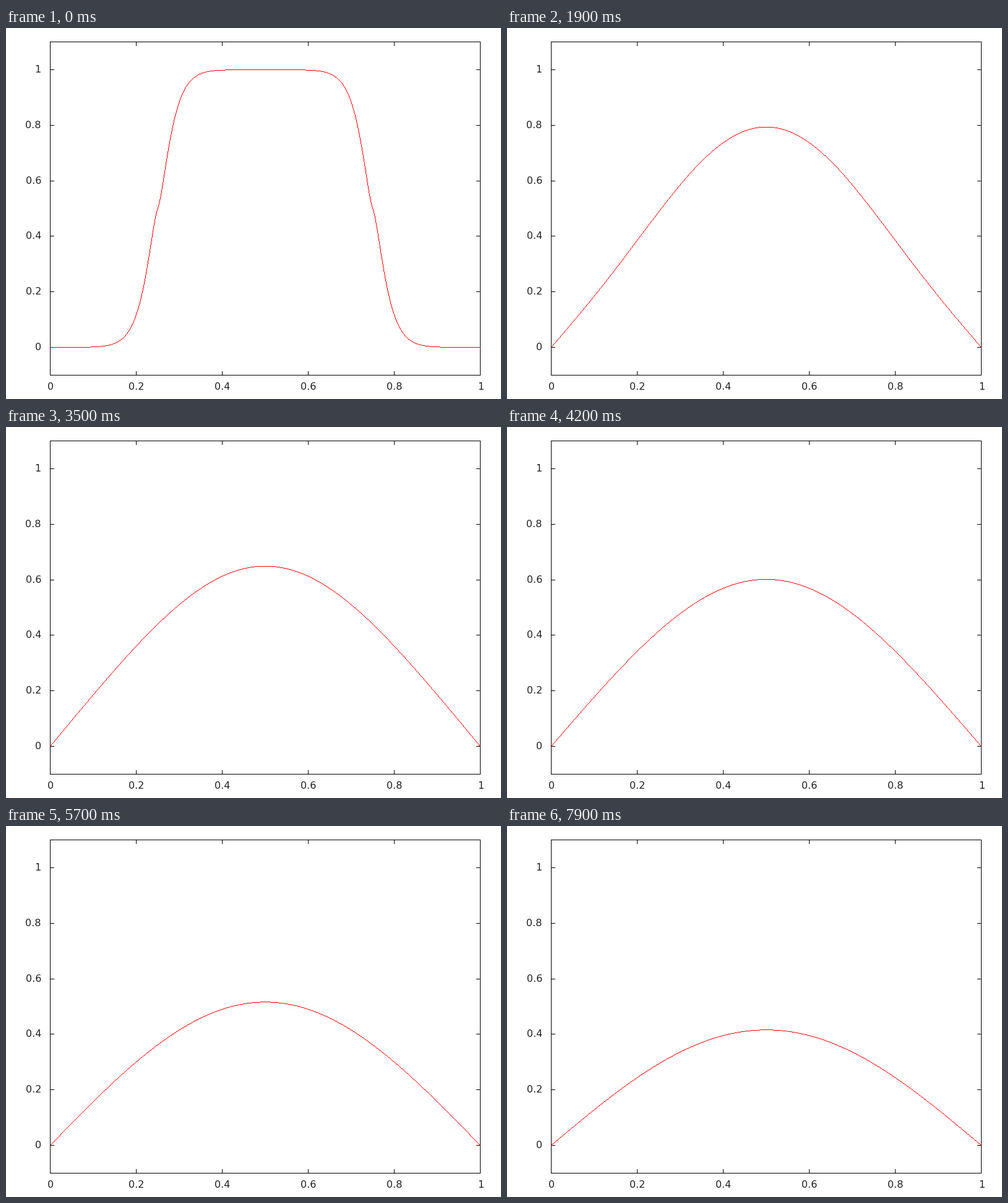
These frames come from a looping animation (800 px wide and 600 px high, 8 s). A matplotlib script:

```python
import numpy as np
import matplotlib.pyplot as plt
from matplotlib.animation import FuncAnimation
from matplotlib.collections import LineCollection

W, H, DPI = 800, 600, 100
FRAMES, INTERVAL = 80, 100
HAIR = 0.4 * 72 / DPI  # stays inside one pixel, which is then filled whole

# Pixel columns and rows of the plot box and its scale
LEFT, RIGHT, TOP, BOTTOM = 71, 766, 22, 561
ZERO_Y, UNIT_Y = 516, 449
TICK = 6

fig = plt.figure(figsize=(W / DPI, H / DPI), dpi=DPI, facecolor="white")
ax = fig.add_axes([0, 0, 1, 1])
ax.set_xlim(0, W)
ax.set_ylim(H, 0)
ax.axis("off")


def rule(cols, rows):
    ax.plot(np.add(cols, 0.5), np.add(rows, 0.5), color="black", lw=HAIR,
            antialiased=False, snap=False, solid_capstyle="projecting",
            solid_joinstyle="miter")


def label(x, y, text, align):
    ax.text(x, y, text, ha=align, va="baseline", color="#202020",
            family="DejaVu Sans", fontsize=16 * 72 / DPI)


def draw_axes():
    rule([LEFT, RIGHT, RIGHT, LEFT, LEFT], [TOP, TOP, BOTTOM, BOTTOM, TOP])
    for i in range(6):
        v = i / 5
        col = round(LEFT + (RIGHT - LEFT) * v)
        row = round(ZERO_Y - UNIT_Y * v)
        rule([col, col], [BOTTOM, BOTTOM - TICK])
        rule([col, col], [TOP, TOP + TICK])
        rule([LEFT, LEFT + TICK], [row, row])
        rule([RIGHT, RIGHT - TICK], [row, row])
        label(col + 1, 585, f"{v:g}", "center")
        label(57, row + 5, f"{v:g}", "right")


# Sine series of a unit box on [0.25, 0.75] with zero ends
cols = np.arange(LEFT, RIGHT + 1)
half_cols = np.arange(LEFT - 0.5, RIGHT + 0.6, 0.5)
x = np.clip((half_cols - LEFT) / (RIGHT - LEFT), 0, 1)
n = np.arange(1, 600, 2)
coef = 2 / (n * np.pi) * (np.cos(n * np.pi / 4) - np.cos(3 * n * np.pi / 4))
modes = coef[:, None] * np.sin(np.pi * np.outer(n, x))

# Each mode's factor in one implicit second-order time step
DIFFUSION, MIX = 0.00098, 1.7
damp = 1 / (1 + (np.pi * n) ** 2 * DIFFUSION / (MIX + 1))
factor = MIX * damp ** 2 - (MIX - 1) * damp


def heat(k):
    return factor ** (k + 1) @ modes


def pixel_runs(u):
    """One vertical run of pixels per column, from values at half columns."""
    y = ZERO_Y - UNIT_Y * u
    edge, mid = y[::2], y[1::2]
    first = np.ceil(np.minimum(edge[:-1], edge[1:]))
    last = np.ceil(np.maximum(edge[:-1], edge[1:])) - 1
    flat = last < first
    first[flat] = last[flat] = np.floor(mid[flat] + 0.5)
    xs = cols + 0.5
    return np.stack([np.column_stack([xs, first + 0.3]),
                     np.column_stack([xs, last + 0.7])], axis=1)


draw_axes()
curve = LineCollection(pixel_runs(heat(0)), colors="#ff0000", linewidths=HAIR,
                       antialiaseds=False, zorder=5)
curve.set_snap(False)
ax.add_collection(curve, autolim=False)


def update(k):
    curve.set_segments(pixel_runs(heat(k)))
    return curve,


anim = FuncAnimation(fig, update, frames=FRAMES, interval=INTERVAL,
                     repeat=True, repeat_delay=0)
plt.show()
```
